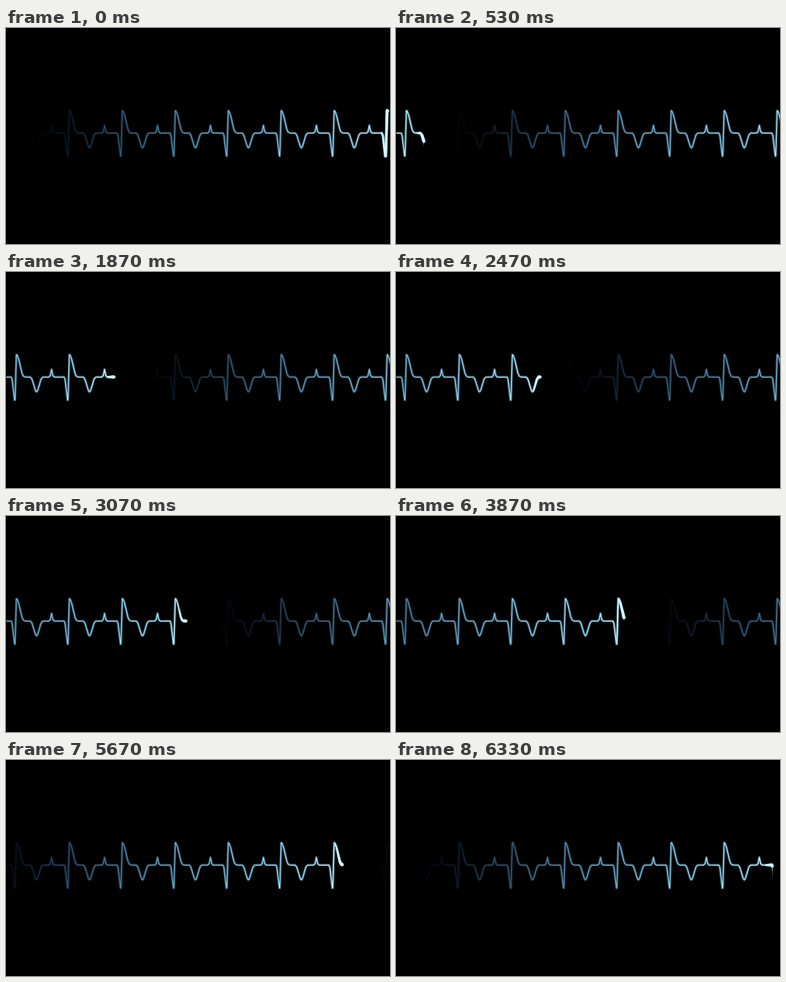
Animation, 480 px wide and 270 px high, one loop 6390 ms. Source, as an HTML page with a canvas:

```html
<!DOCTYPE html>
<html lang="en">
<head>
<meta charset="utf-8">
<title>Heartbeat trace</title>
<style>
html, body { margin: 0; width: 100%; height: 100%; overflow: hidden; background: #000; }
canvas { display: block; }
</style>
</head>
<body>
<canvas width="480" height="270"></canvas>
<script>
const ctx = document.querySelector('canvas').getContext('2d');
const W = 480, H = 270, LOOP = 6390, BEAT = 66.2, TIP = 9;

// One heartbeat as [x, y] knots
const beat = [
  [1, 131.3], [6.3, 131.3], [7.6, 134], [10.7, 160], [11.3, 160], [13, 103.3], [14, 104],
  [16, 109.5], [18, 118], [20, 126.5], [21.6, 130], [24, 131.3], [30.5, 131.3],
  [32.5, 134], [36.8, 148], [38.2, 149.8], [39.6, 148], [43.8, 134], [46, 131.3],
  [53.5, 131.3], [55.4, 129.5], [57, 121.7], [58.6, 129.5], [60.5, 131.3]
];
const points = [];
for (let n = 0; n < 8; n++)
  for (const [x, y] of beat) points.push([x + n * BEAT, y]);

const trace = new Path2D();
points.forEach(([x, y]) => trace.lineTo(x, y));

// Colour by distance behind the pen
const fade = [
  [450, '#000'], [425, '#04070e'], [395, '#0c1828'], [350, '#234560'],
  [300, '#396480'], [230, '#5590b0'], [120, '#79b9d9'], [30, '#92d0ec'], [0, '#c4efff']
];

function fadeGradient(head) {
  const g = ctx.createLinearGradient(head - W, 0, head, 0);
  for (const [age, color] of fade) g.addColorStop(1 - age / W, color);
  g.addColorStop(1, '#000');
  return g;
}

function strokeTrace(width, alpha) {
  ctx.lineWidth = width;
  ctx.globalAlpha = alpha;
  ctx.stroke(trace);
}

// Swelling bright end of the line
function drawTip(head, extra, color) {
  ctx.strokeStyle = color;
  for (let i = 1; i < points.length; i++) {
    const [x0, y0] = points[i - 1], [x1, y1] = points[i];
    if (x1 < head - TIP || x0 > head) continue;
    const steps = Math.ceil((x1 - x0) / 0.4);
    for (let s = 0; s < steps; s++) {
      const a = s / steps, b = (s + 1) / steps;
      const x = x0 + (x1 - x0) * b, age = head - x;
      if (age < 0 || age > TIP) continue;
      ctx.lineWidth = 1 + extra + 2.3 * (1 - age / TIP);
      ctx.beginPath();
      ctx.moveTo(x0 + (x1 - x0) * a, y0 + (y1 - y0) * a);
      ctx.lineTo(x, y0 + (y1 - y0) * b);
      ctx.stroke();
    }
  }
}

// The pen moves in 15 steps per second
function headAt(t) {
  const r = t % 200;
  const k = Math.floor(t / 200) * 3 + (r >= 70) + (r >= 130);
  const time = Math.max(k, 0.5) < 2 ? 33 : k * 200 / 3;
  return (34.7 + (time - 530) * W / LOOP + W) % W;
}

function draw(t) {
  const head = headAt(t);
  ctx.globalCompositeOperation = 'source-over';
  ctx.globalAlpha = 1;
  ctx.fillStyle = '#000';
  ctx.fillRect(0, 0, W, H);
  ctx.lineJoin = ctx.lineCap = 'round';
  ctx.globalCompositeOperation = 'lighter';
  for (const end of [head, head + W]) {
    ctx.strokeStyle = fadeGradient(end);
    strokeTrace(3.6, 0.28);
    strokeTrace(1.3, 0.85);
  }
  ctx.globalCompositeOperation = 'source-over';
  ctx.globalAlpha = 1;
  drawTip(head, 0.8, '#6fb9d6');
  drawTip(head, 0, '#d8f7ff');
}

const start = performance.now();
function tick() {
  draw((performance.now() - start) % LOOP);
  requestAnimationFrame(tick);
}
tick();
</script>
</body>
</html>
```
